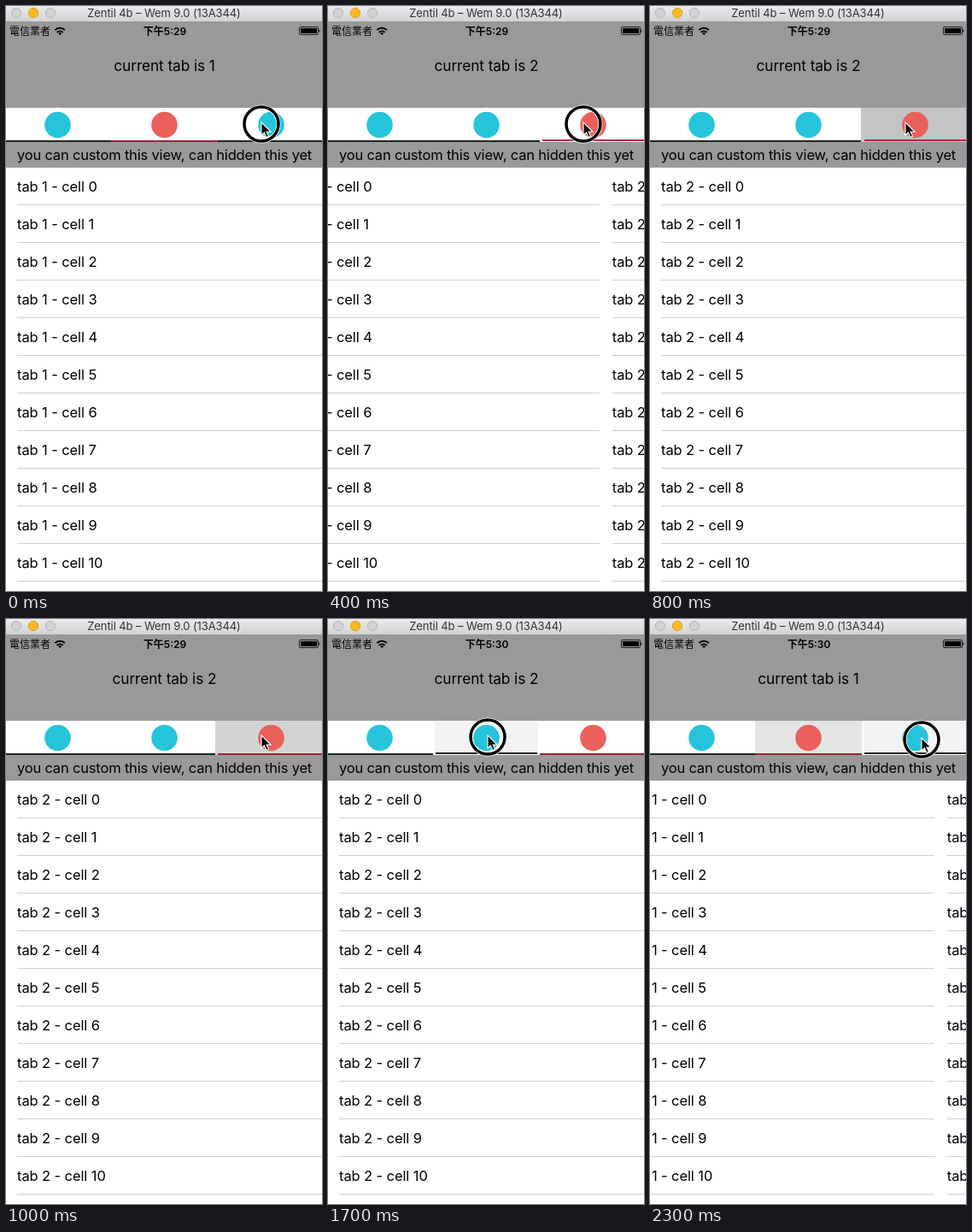
Write an HTML page that moves like this. It is 370 by 684 pixels and loops after 2400 ms.

```html
<!DOCTYPE html>
<html lang="en">
<head>
<meta charset="utf-8">
<title>Tab pager</title>
<style>
html, body { margin: 0; height: 100%; overflow: hidden; background: #fff; }
svg { display: block; width: 370px; height: 684px; }
text { font: 16.5px Inter, "Noto Sans CJK TC", "Noto Sans CJK SC", "Noto Sans CJK JP", sans-serif; letter-spacing: -.1px; white-space: pre; }
.mid { text-anchor: middle; }
.small { font-size: 12px; letter-spacing: 0; }
</style>
</head>
<body>
<svg viewBox="0 0 370 684">
  <defs>
    <linearGradient id="bar" x2="0" y2="1">
      <stop stop-color="#ebebeb"/><stop offset="1" stop-color="#d3d3d3"/>
    </linearGradient>
  </defs>
  <rect width="370" height="684" fill="#fff"/>
  <g id="pages"></g>

  <rect width="370" height="18" fill="url(#bar)"/>
  <circle cx="12" cy="8" r="5.6" fill="#d2d2d2" stroke="#b4b4b4"/>
  <circle cx="32" cy="8" r="5.6" fill="#fdb924" stroke="#dd9f22"/>
  <circle cx="52" cy="8" r="5.6" fill="#d2d2d2" stroke="#b4b4b4"/>
  <text class="mid" x="185" y="13" fill="#333" style="font-size:13px">Zentil 4b – Wem 9.0 (13A344)</text>

  <rect y="18" width="370" height="171" fill="#999"/>
  <text class="small" x="4" y="34">電信業者</text>
  <path d="M57.3 28.2a8.2 8.2 0 0 1 11.6 0M59.6 30.8a4.9 4.9 0 0 1 7 0" fill="none" stroke="#000" stroke-width="1.9"/>
  <path d="M63.1 34l-1.9-2a2.7 2.7 0 0 1 3.8 0z"/>
  <text id="clock" class="mid small" x="186" y="34" font-weight="600" style="font-weight:600"></text>
  <rect x="343.5" y="24.5" width="22" height="9" rx="1.5" fill="none" stroke="#000" stroke-width=".8"/>
  <rect x="345" y="26" width="19" height="6"/>
  <path d="M366.5 27.2a2 2 0 0 1 0 3.6z"/>
  <text id="head" class="mid" x="185.5" y="75.5" style="font-size:17.3px"></text>
  <text class="mid" x="185.5" y="180" style="letter-spacing:-.175px">you can custom this view, can hidden this yet</text>

  <rect y="119" width="370" height="40" fill="#fff"/>
  <g id="tabs"></g>
  <g id="pointer">
    <g id="ring" fill="none">
      <circle cy="2" r="20" stroke="#fff" stroke-width="5"/>
      <circle cy="2" r="20" stroke="#000" stroke-width="3.5"/>
    </g>
    <path d="M0 0V15l3.5-3 2.4 5.4 2.6-1.1-2.4-5.3H11z" stroke="#fff" stroke-width="1.1"/>
  </g>
</svg>
<script>
const LOOP = 2400, PAGE = 375, LEFT = -2, TAB = 125, SLIDE = 448, FADE = 370;

// Each touch: the pointer arrives, goes down, the tab is selected, the finger lifts.
const touches = [
  { tab: 2, x: 299, y: 136, arrive: 0, down: 0, select: 334, lift: 830 },
  { tab: 1, x: 187, y: 136, arrive: 1400, down: 1700, select: 1900, lift: 1940 },
  { tab: 2, x: 318, y: 139, arrive: 2100, down: 2300, select: 2500, lift: 2800 }
];

const $ = id => document.getElementById(id);
const clamp = v => Math.min(1, Math.max(0, v));
const move = (id, x, y = 0) => $(id).setAttribute('transform', `translate(${x} ${y})`);
const rect = (x, y, w, h, fill) => `<rect x="${x}" y="${y}" width="${w}" height="${h}" fill="${fill}"/>`;

const page = n => `<g id="page${n}">` + Array.from({ length: 11 }, (_, i) =>
  `<text x="15" y="${217 + 44 * i}">tab ${n} - cell ${i}</text>` +
  rect(15, 232 + 44 * i, PAGE - 15, 1, '#d0d0d0')).join('') + '</g>';
$('pages').innerHTML = page(1) + page(2);

const isActive = (touch, t) => t >= touch.select - 200 && t < touch.lift + FADE;

// A touched tab shrinks, turns grey, then swells and fades once the finger lifts.
function backdrop(touch, t) {
  const age = t - touch.select, lifted = t - touch.lift;
  if (age < 200) return [-2, age < 0 ? 242 : 255];
  if (lifted < 0) return [1, 196];
  return [Math.round(6 * (1 - lifted / FADE)), Math.round(196 + .09 * lifted)];
}

function tab(i, selected, touch, t) {
  const x = LEFT + TAB * i;
  const [grow, grey] = touch ? backdrop(touch, t) : [0, 255];
  const held = touch && t < touch.lift;
  const inset = held ? 3 : 0, top = grow < 0 ? 120 : 119;
  const red = held ? '#c8243c' : '#96283a';
  return rect(x - grow, top, TAB + 2 * grow, 2 * (139 - top), `rgb(${grey},${grey},${grey})`) +
    rect(x + inset, held ? 156 : 157, TAB - 2 * inset, 2, selected ? red : '#1f2823') +
    `<circle cx="${x + 62.5}" cy="139" r="15.3" fill="${selected ? '#ea605a' : '#26c4db'}"/>`;
}

function render(t) {
  const selected = touches.findLast(k => k.select <= t)?.tab ?? 1;
  const shift = PAGE * touches.reduce((sum, k) =>
    sum + (k.tab === 1 ? 1 : -1) * clamp((t - k.select) / SLIDE), 1);
  move('page1', LEFT + shift - PAGE);
  move('page2', LEFT + shift);
  $('clock').textContent = t < 1200 ? '下午5:29' : '下午5:30';
  $('head').textContent = 'current tab is ' + selected;

  // Touched tabs may overlap their neighbours, so they go on top.
  $('tabs').innerHTML = [0, 1, 2]
    .map(i => ({ i, touch: touches.findLast(k => k.tab === i && isActive(k, t)) }))
    .sort((a, b) => !!a.touch - !!b.touch)
    .map(({ i, touch }) => tab(i, i === selected, touch, t)).join('');

  const at = touches.findLast(k => k.arrive <= t);
  move('pointer', at.x, at.y);
  const ring = t >= at.down && t < at.select + 200;
  $('ring').setAttribute('visibility', ring ? 'visible' : 'hidden');
}

// The picture advances every 200 ms, with one 100 ms delay after the pause.
let shown;
function draw() {
  const now = performance.now() % LOOP;
  const t = now - (now < 1500 ? now : now - 100) % 200;
  const tick = Math.round(t);
  if (tick !== shown) render(shown = tick);
  requestAnimationFrame(draw);
}
draw();
</script>
</body>
</html>
```
